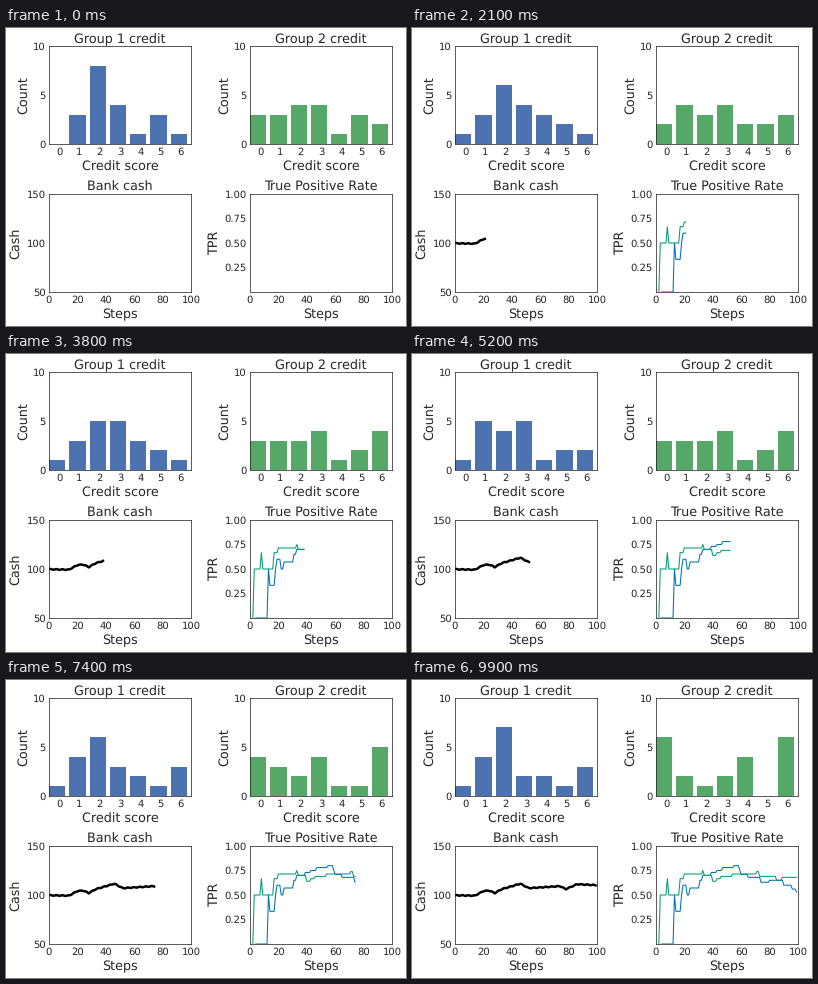
A matplotlib script that plays this animation: 400 by 298 pixels, repeating every 10000 ms.

```python
import numpy as np
import matplotlib.pyplot as plt
from matplotlib.animation import FuncAnimation

W, H, DPI = 400, 298, 100
STEPS = 100
PT = 72 / DPI  # points per pixel
INK = "0.15"
TICK, LABEL = 10 * PT, 12.8 * PT
PANEL_W, PANEL_H = 142, 98
PHASES = [0, 21, 38, 52, 74, 87, 99]

plt.rcParams.update({
    "font.family": "DejaVu Sans",
    "text.color": INK,
    "text.hinting": "no_hinting",
    "axes.edgecolor": INK,
    "axes.linewidth": 0.75 * PT,
    "xtick.labelcolor": INK,
    "ytick.labelcolor": INK,
})

fig = plt.figure(figsize=(W / DPI, H / DPI), dpi=DPI, facecolor="white")


def text(x, y, s, rotation=0):
    fig.text(x / W, 1 - y / H, s, fontsize=LABEL, ha="center", va="baseline",
             rotation=rotation, rotation_mode="anchor")


def panel(left, top, title, xlabel, ylabel, gap):
    ax = fig.add_axes([left / W, 1 - (top + PANEL_H) / H,
                       PANEL_W / W, PANEL_H / H])
    ax.tick_params(length=0, labelsize=TICK)
    ax.tick_params(axis="x", pad=3.75 * PT)
    ax.tick_params(axis="y", pad=3 * PT)
    mid = left + PANEL_W / 2
    text(mid, top - 3, title)
    text(mid, top + PANEL_H + 26.4, xlabel)
    text(left - gap, top + PANEL_H / 2, ylabel, 90)
    return ax


def histogram(left, title, color):
    ax = panel(left, 18, title, "Credit score", "Count", 22.3)
    ax.set(xlim=(-0.5, 6.5), ylim=(0, 10), xticks=range(7), yticks=[0, 5, 10])
    return ax.bar(np.arange(7) - 0.5, np.zeros(7), 0.8, align="edge",
                  color=color, linewidth=0)


def chart(left, title, ylabel, gap, ylim, yticks):
    ax = panel(left, 166, title, "Steps", ylabel, gap)
    ax.set(xlim=(0, 100), ylim=ylim, xticks=range(0, 101, 20), yticks=yticks)
    return ax


def history(start, *phases):
    """Counts per step, with the moves of a phase spread evenly over it.

    Move +k lifts one borrower to score k, move -k drops one from score k.
    """
    counts = np.tile(start, (STEPS, 1))
    for begin, end, moves in zip(PHASES, PHASES[1:], phases):
        times = np.linspace(begin, end, len(moves) + 2)[1:-1].astype(int)
        for step, move in zip(times, moves):
            sign, score = np.sign(move), abs(move)
            counts[step:, score] += sign
            counts[step:, score - 1] -= sign
    return np.maximum(counts, 0)


def levels(*keys):
    """A rate that keeps its value until the next key step."""
    at, value = np.transpose(keys)
    steps = np.arange(STEPS)
    held = value[np.searchsorted(at, steps, side="right") - 1]
    return np.where(steps < at[0], np.nan, held)


def wavy(*keys):
    """Straight runs between the key points, with a small ripple on top."""
    steps = np.arange(STEPS)
    return np.interp(steps, *np.transpose(keys)) + 0.4 * np.sin(1.5 * steps)


group1 = history([0, 3, 8, 4, 1, 3, 1],
                 [3, 4, -5, -1, -2], [3], [5, 6, -2, -3, -4, -2],
                 [2, -3, 4, 6], [-3])
group2 = history([3, 3, 4, 4, 1, 3, 2],
                 [1, 4, 3, 6], [-1, 5, 6], [], [-2, 6, -1],
                 [-5, -1, 4, 4], [-2, -1, 6])

cash = wavy((0, 99.7), (14, 99.3), (20, 104), (24, 104.5), (28, 102),
            (33, 106), (46, 111.5), (52, 107), (74, 109), (78, 106),
            (86, 111), (100, 110))
tpr1 = levels((4, 0), (13, 1 / 2), (14, 1 / 3), (18, 1 / 2), (19, 0.6),
              (22, 1 / 2), (24, 4 / 7), (31, 0.65), (33, 0.7), (39, 0.73),
              (43, 0.75), (47, 0.78), (55, 0.8), (59, 0.75), (60, 0.71),
              (65, 0.68), (74, 0.63), (80, 0.65), (90, 0.6), (96, 0.56),
              (99, 0.53))
tpr2 = levels((2, 0), (3, 1 / 2), (8, 2 / 3), (9, 1 / 2), (17, 2 / 3),
              (20, 5 / 7), (33, 3 / 4), (34, 0.7), (40, 0.64), (43, 2 / 3),
              (46, 0.69), (54, 5 / 7), (71, 0.74), (73, 0.69), (85, 0.65),
              (89, 0.68))

bars1 = histogram(43, "Group 1 credit", "#4C72B0")
bars2 = histogram(244, "Group 2 credit", "#55A868")
cash_ax = chart(43, "Bank cash", "Cash", 28.5, (50, 150), [50, 100, 150])
tpr_ax = chart(244, "True Positive Rate", "TPR", 31.7, (0, 1),
               [0.25, 0.5, 0.75, 1])

lines = [
    (cash_ax.plot([], [], color="black", lw=2.5 * PT)[0], cash),
    (tpr_ax.plot([], [], color="#0072B2", lw=1.05 * PT)[0], tpr1),
    (tpr_ax.plot([], [], color="#009E73", lw=1.05 * PT)[0], tpr2),
]


def update(step):
    for bars, counts in ((bars1, group1), (bars2, group2)):
        for bar, count in zip(bars, counts[step]):
            bar.set_height(count)
    for line, values in lines:
        line.set_data(np.arange(step + 1), values[:step + 1])
    return [*bars1, *bars2, *(line for line, _ in lines)]


anim = FuncAnimation(fig, update, frames=STEPS, interval=100, repeat=True,
                     repeat_delay=0, blit=False)
plt.show()
```
